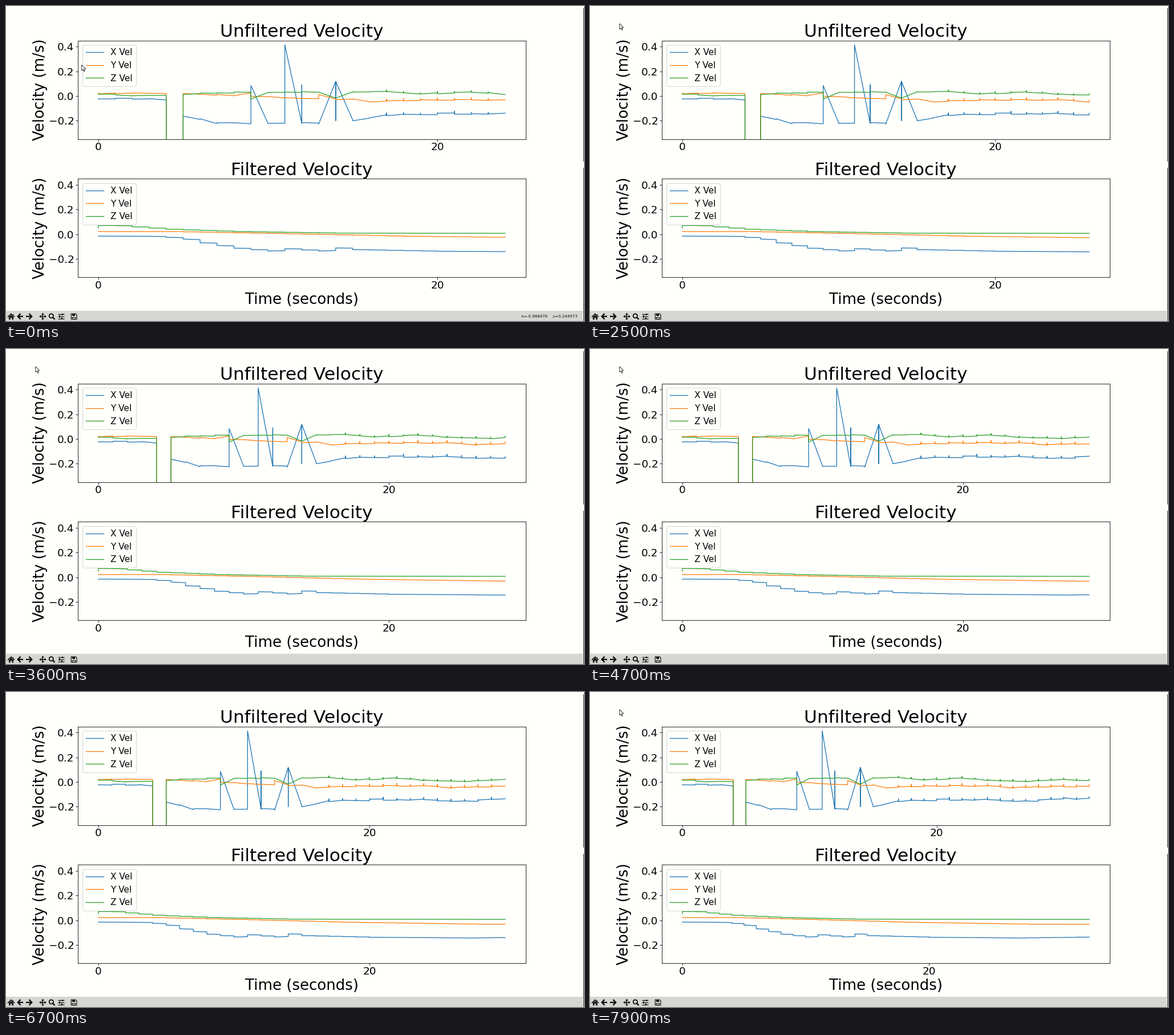
Write a matplotlib script that moves like this. It is 1013 px wide and 553 px high and loops after 8000 ms.

```python
import numpy as np
import matplotlib.pyplot as plt
from matplotlib.animation import FuncAnimation
from matplotlib.patches import Circle, Polygon, Rectangle
from matplotlib.ticker import MultipleLocator

W, H, DPI = 1013, 553, 64
PX = 72 / DPI                # one pixel in points
U = 75 / DPI                 # point sizes are laid out for 75 dpi
PAPER, INK, BAR = "#fffffc", "#0c0c0c", "#d6d7d3"
COLORS = ["#1f77b4", "#ff7f0e", "#2ca02c"]
NAMES = ["X Vel", "Y Vel", "Z Vel"]
LEFT, RIGHT, HEIGHT = 126.2, 910.6, 173
TOPS = (60.6, 303.2)
Y_MIN, Y_MAX = -0.35, 0.45
SECONDS = np.arange(34)

plt.rcParams.update({
    "font.family": "DejaVu Sans",
    "font.size": 10 * U,
    "lines.linewidth": 1.25 * U,
    "axes.linewidth": 0.8 * U,
    "patch.linewidth": 1.0 * U,
    "axes.titlepad": 6 * U,
    "axes.facecolor": PAPER,
    "toolbar": "None",
})
for axis, pad in (("xtick", 2), ("ytick", 3)):
    plt.rcParams.update({
        f"{axis}.major.size": 3.5 * U,
        f"{axis}.major.width": 0.8 * U,
        f"{axis}.major.pad": pad * U,
        f"{axis}.labelsize": 17.7 * U,
    })


class Series:
    """Readings stamped in whole seconds: each second is a vertical stroke
    from its first reading, past an optional peak, to its last one."""

    def __init__(self, first, last, peak):
        self.first, self.last, self.peak = first, last, peak

    def path(self, end, tail):
        pts = []
        for k in range(end + 1):
            pts.append((k, self.first[k]))
            if k in self.peak and (k < end or tail):
                pts.append((k, self.peak[k]))
            if k < end:
                pts.append((k, self.last[k]))
        return np.array(pts).T


def level(keys):
    return np.interp(SECONDS, *zip(*keys))


def raw(keys, seed, spread, lift, first=(), last=(), peak=()):
    """Noisy readings around a level, all lost between seconds 4 and 5."""
    noise = np.random.default_rng(seed).uniform(-spread, spread, (2, len(SECONDS)))
    a, b = level(keys) + noise
    for values, fixed in ((a, first), (b, last)):
        for k, v in dict(fixed).items():
            values[k] = v
    b[4] = a[5] = -3
    return Series(a, b, {**{k: a[k] + lift for k in range(17, 34)}, **dict(peak)})


def filtered(keys):
    """Stepped level that drifts slightly towards the next step."""
    b = level(keys)
    a = np.append(b[0], b[:-1] + 0.15 * np.diff(b))
    return Series(a, b, {})


RAW = [
    raw([(0, -0.019), (4, -0.027), (5, -0.16), (7, -0.22), (13, -0.222), (15, -0.2),
         (17, -0.155), (20, -0.145), (24, -0.145), (27, -0.158), (30, -0.135),
         (33, -0.135)],
        3, 0.007, 0.014, first={14: 0.118}, last={9: 0.085, 11: 0.415, 14: 0.118},
        peak={12: 0.09, 14: -0.2}),
    raw([(0, 0.02), (4, 0.024), (8, 0.005), (13, -0.026), (15, -0.028), (16, -0.046),
         (19, -0.034), (24, -0.032), (26, -0.048), (29, -0.036), (33, -0.036)],
        5, 0.004, 0.016, first={9: 0.025}, last={13: 0.011}),
    raw([(0, 0.018), (2, 0.002), (4, 0.002), (5, 0.016), (9, 0.03), (17, 0.036),
         (19, 0.014), (22, 0.034), (24, 0.016), (27, 0.006), (30, 0.02), (33, 0.012)],
        8, 0.005, 0.011, first={14: -0.018}, last={9: -0.025, 14: -0.018}),
]
FILTERED = [
    filtered([(0, -0.016), (3, -0.018), (4, -0.026), (5, -0.04), (6, -0.07),
              (8, -0.114), (10, -0.137), (11, -0.119), (13, -0.137), (14, -0.112),
              (15, -0.126), (20, -0.139), (27, -0.145), (33, -0.137)]),
    filtered([(0, 0.021), (4, 0.021), (10, 0.006), (18, -0.017), (28, -0.033),
              (33, -0.034)]),
    filtered([(0, 0.07), (1, 0.069), (4, 0.04), (8, 0.021), (14, 0.008), (33, 0.006)]),
]
FILTERED[2].first[0] = 0.05

fig = plt.figure(figsize=(W / DPI, H / DPI), dpi=DPI, facecolor=PAPER)


def add_plot(top, title):
    ax = fig.add_axes([LEFT / W, 1 - (top + HEIGHT) / H, (RIGHT - LEFT) / W, HEIGHT / H])
    ax.set_title(title, fontsize=30 * U)
    ax.set_ylabel("Velocity (m/s)", fontsize=25 * U, labelpad=1.5 * U)
    ax.set_ylim(Y_MIN, Y_MAX)
    ax.xaxis.set_major_locator(MultipleLocator(20))
    ax.yaxis.set_major_locator(MultipleLocator(0.2))
    lines = [ax.plot([], [], color=c, label=n)[0] for c, n in zip(COLORS, NAMES)]
    ax.legend(loc="upper left", fontsize=14.8 * U)
    return ax, lines


upper, upper_lines = add_plot(TOPS[0], "Unfiltered Velocity")
lower, lower_lines = add_plot(TOPS[1], "Filtered Velocity")
lower.set_xlabel("Time (seconds)", fontsize=25 * U, labelpad=3 * U)

# Window chrome, drawn in screen pixels with y pointing down
ui = fig.add_axes([0, 0, 1, 1], zorder=5)
ui.set(xlim=(0, W), ylim=(H, 0))
ui.axis("off")


def box(x, y, w, h, color=INK):
    ui.add_patch(Rectangle((x, y), w, h, fc=color, lw=0))


def stroke(points, width):
    ui.plot(*zip(*points), color=INK, lw=width * PX,
            solid_capstyle="butt", solid_joinstyle="miter")


def shape(points):
    ui.add_patch(Polygon(points, fc=INK, lw=0))


def draw_chrome():
    box(0, 535, 1011, 18, BAR)
    for y in (4, 284):
        box(1012, y, 1, 269, "#25282e")

    # home
    stroke([(3, 546), (9, 540.5), (15, 546)], 1.6)
    shape([(5, 546), (9, 542.3), (13, 546), (13, 550.5), (10.2, 550.5),
           (10.2, 547), (7.8, 547), (7.8, 550.5), (5, 550.5)])
    box(12, 540.5, 1.5, 3)
    # back and forward
    for x, s in ((25, 1), (41, -1)):
        stroke([(x + s * 0.5, 540), (x - s * 4.2, 545), (x + s * 0.5, 550)], 2.3)
        stroke([(x - s * 3.5, 545), (x + s * 5.5, 545)], 2.3)
    # pan
    stroke([(60, 545), (69, 545)], 1.5)
    stroke([(64.5, 540.5), (64.5, 549.5)], 1.5)
    for dx, dy in ((1, 0), (-1, 0), (0, 1), (0, -1)):
        x, y = 64.5 + 3.3 * dx, 545 + 3.3 * dy
        shape([(x + 3 * dx, y + 3 * dy), (x + 2.5 * dy, y + 2.5 * dx),
               (x - 2.5 * dy, y - 2.5 * dx)])
    # zoom
    ui.add_patch(Circle((79.3, 544), 3.6, fill=False, ec=INK, lw=1.8 * PX))
    stroke([(82, 546.7), (85.5, 550.2)], 2.4)
    # sliders
    for y, knob in ((541.3, 99), (545, 94), (548.7, 98)):
        stroke([(91.5, y), (102.5, y)], 1.2)
        box(knob - 1.2, y - 1.6, 2.6, 3.2)
    # save
    stroke([(114.3, 540.3), (122, 540.3), (124, 542.3), (124, 549.8),
            (114.3, 549.8), (114.3, 539.8)], 1.2)
    box(116.3, 540.5, 5.2, 3)
    box(116.3, 546, 5.7, 3.5)
    box(117.4, 547, 3.5, 2, BAR)


draw_chrome()
readout = ui.text(903, 545, "x=-0.988476    y=0.244973", fontsize=7 * PX,
                  va="center", color="#111111")
ARROW = np.array([(0, 0), (0, 9.8), (2.3, 7.8), (4, 11.5), (5.5, 10.8),
                  (3.9, 7.3), (7, 7.1)])
cursor = Polygon(ARROW, fc="white", ec="#222222", lw=0.9 * PX)
ui.add_patch(cursor)

START = 24
ARRIVALS = [round(4 + 10.8 * n) for n in range(7)] + [78]
LOWER_ARRIVALS = ARRIVALS + [79]                 # lower plot redraws first
UPPER_ARRIVALS = ARRIVALS + [80]
LONG_SECOND = 28                                 # drawn late, with all its readings
HIDDEN = {1, 2, 3, 13, 15, 24, 35, 46, 56, 67, 68, 78}   # cursor lost in redraws


def show(ax, lines, data, arrivals, step):
    end = START + sum(a <= step for a in arrivals)
    tail = step + 1 in arrivals or end == LONG_SECOND
    ax.set_xlim(-0.05 * end, 1.05 * end)
    for line, series in zip(lines, data):
        line.set_data(*series.path(end, tail))


def update(step):
    show(upper, upper_lines, RAW, UPPER_ARRIVALS, step)
    show(lower, lower_lines, FILTERED, LOWER_ARRIVALS, step)
    readout.set_visible(step < 2)
    cursor.set_visible(step not in HIDDEN)
    pos = (132.7, 103.5) if step < 4 else (62.7, 38) if step < 16 else (51.7, 30.8)
    cursor.set_xy(ARROW + pos)
    return []


anim = FuncAnimation(fig, update, frames=80, interval=100, repeat=True,
                     repeat_delay=0, init_func=lambda: update(0))
plt.show()
```
